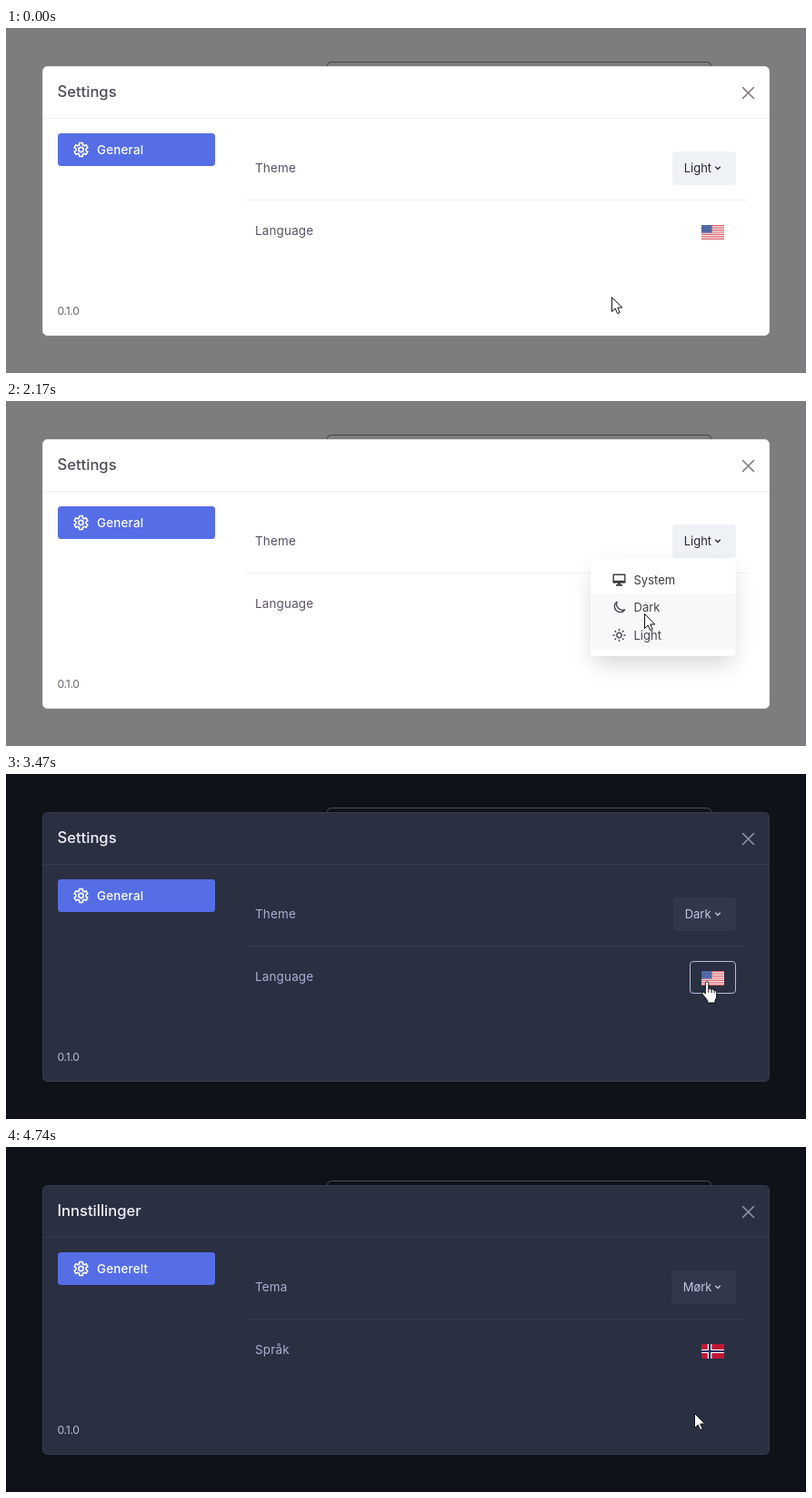
An HTML page that plays this animation: 880x380 px, repeating every 6.01 s.

```html
<!DOCTYPE html>
<html lang="en">
<head>
<meta charset="utf-8">
<title>Settings dialog</title>
<style>
html, body { margin: 0; width: 100%; height: 100%; overflow: hidden; }
svg { display: block; }
#stage {
  --back: #7c7d7e; --behind: #4a4143; --panel: #fff; --edge: #e4e6e8; --rule: #eff1f4;
  --title: #514c5a; --label: #5a5066; --version: #696373; --close: #80777b;
  --button: #eef2f7; --buttonText: #2b2540; --menu: #fff; --menuEdge: #fbfbfc;
  --item: #3b3b40; --itemOn: #46484c; --itemBack: #f6f8f9; --shade: .17;
  font-family: Poppins, Inter, sans-serif; font-size: 13.4px;
}
#stage.dark {
  --back: #0f1218; --behind: #484c5a; --panel: #2b2f42; --edge: #363b50; --rule: #353a4e;
  --title: #f1f2f8; --label: #aab0d3; --version: #b9bed3; --close: #9094a8;
  --button: #32374c; --buttonText: #c3c8e2; --menu: #2b2f42; --menuEdge: #34394f;
  --item: #9095b3; --itemOn: #dcdfed; --itemBack: #32374c; --shade: .2;
}
.title { font-size: 16.6px; font-weight: 500; fill: var(--title); }
.label { fill: var(--label); letter-spacing: .2px; }
.small { font-size: 13px; }
.medium { font-weight: 500; }
.item { fill: var(--item); color: var(--item); }
.item.on { fill: var(--itemOn); color: var(--itemOn); }
.item > .back { fill: var(--itemBack); visibility: hidden; }
.item.on > .back { visibility: visible; }
.line { fill: none; stroke: currentColor; stroke-width: 1.4; }
.pointer { fill: #fff; stroke: #111; stroke-linejoin: round; }
</style>
</head>
<body>
<svg id="stage" width="880" height="380" viewBox="0 0 880 380">
  <defs>
    <filter id="blur" x="-40%" y="-50%" width="180%" height="200%"><feGaussianBlur stdDeviation="13"/></filter>
    <symbol id="us" viewBox="0 0 26 13" preserveAspectRatio="none">
      <path fill="#f3eef0" d="M0 0H26V13H0Z"/>
      <path stroke="#df606b" d="M0 .5H26M0 2.5H26M0 4.5H26M0 6.5H26M0 8.5H26M0 10.5H26M0 12.5H26"/>
      <path fill="#4a619f" d="M0 0H12V7H0Z"/>
      <path stroke="#9aa8cc" stroke-width=".7" stroke-dasharray=".8 1.4" d="M1 1.2H11.5M2 3.5H11.5M1 5.8H11.5"/>
    </symbol>
    <symbol id="no" viewBox="0 0 22 16" preserveAspectRatio="none">
      <path fill="#c11734" d="M0 0H22V16H0Z"/>
      <path stroke="#fff" stroke-width="4" d="M8 0V16M0 8H22"/>
      <path stroke="#18305f" stroke-width="2" d="M8 0V16M0 8H22"/>
    </symbol>
    <symbol id="tr" viewBox="0 0 18 12" preserveAspectRatio="none">
      <path fill="#e30a17" d="M0 0H18V12H0Z"/>
      <circle cx="6.4" cy="6" r="3" fill="#fff"/><circle cx="7.2" cy="6" r="2.4" fill="#e30a17"/>
      <path fill="#fff" d="M8.6 6l2.3-1.2v2.4z"/>
    </symbol>
  </defs>

  <rect width="880" height="380" fill="var(--back)"/>
  <rect x="353.5" y="37.5" width="422" height="40" rx="4" fill="none" stroke="var(--behind)"/>
  <rect x="40.5" y="42.5" width="799" height="296" rx="5" fill="var(--panel)" stroke="var(--edge)"/>
  <path d="M41 99.5H839M263 189.5H816" stroke="var(--rule)"/>
  <path d="M810.5 65.5l12 12m0-12l-12 12" stroke="var(--close)" stroke-width="1.6" stroke-linecap="round"/>
  <text id="title" class="title" x="56.5" y="76"></text>
  <rect x="57" y="116" width="173" height="36" rx="3.5" fill="#556ee6"/>
  <g transform="translate(82.5 134)" fill="none" stroke="#fff" stroke-width="1.6" stroke-linejoin="round">
    <path id="gear"/><circle r="2.6"/>
  </g>
  <text id="general" class="medium" x="100" y="139" fill="#fff" letter-spacing=".2"></text>
  <text id="theme" class="label" x="274" y="159"></text>
  <text id="language" class="label" x="274" y="228"></text>
  <text x="56.5" y="316" fill="var(--version)" font-size="12.2" letter-spacing="-.3">0.1.0</text>

  <rect id="button" y="136" height="37" rx="4" fill="var(--button)"/>
  <rect id="pressed" x="733.5" y="136.5" width="69" height="36" rx="4" fill="#c8cbd0" stroke="#b2b5ba"/>
  <text id="choice" class="small" y="159" fill="var(--buttonText)"></text>
  <path d="M780.3 152.8l2.7 2.7 2.7-2.7" fill="none" stroke="var(--buttonText)" stroke-width="1.3"/>
  <rect id="flagFrame" x="752.5" y="206.5" width="50" height="35" rx="3.5" fill="none" stroke="#b8bdd6"/>
  <use id="flag" x="765" y="217" width="25" height="16"/>

  <g id="themeMenu"></g>
  <g id="languageMenu"></g>

  <g id="cursor" class="pointer">
    <path id="arrow" d="M.5 .5V16.5L4.2 13L6.7 18.6L9.2 17.5L6.8 12H11.7Z"/>
    <g id="hand">
      <path d="M-1.7 13V1.5a1.75 1.75 0 0 1 3.5 0V7.8q1.7-1.2 3.2.5 1.8-.8 3.1.8 2.6-.2 2.6 2.3V15.5q0 2.6-1.7 4.8V23H.8V20.6L-4.7 13.8q-1.3-2.5.7-2.9 1.1.1 2.3 2.1Z"/>
      <path d="M1.8 7.8v4M5 8.4v3.6M8.1 9.2v3" fill="none"/>
    </g>
  </g>
</svg>
<script>
const LOOP = 6010;
const THEME_OPEN = 950, RELEASE = 2070, GO_DARK = 2190;
const LANG_OPEN = 3550, GO_NORWEGIAN = 4740;
const OPEN_TIME = 300, DROP = 10;

const $ = id => document.getElementById(id);
const set = (id, attrs) => { for (const k in attrs) $(id).setAttribute(k, attrs[k]); };
const show = (id, on) => set(id, { visibility: on ? 'visible' : 'hidden' });
const progress = (t, from, to) => Math.min(1, Math.max(0, (t - from) / (to - from)));
const smooth = p => p * p * (3 - 2 * p);
const easeOut = p => 1 - (1 - p) ** 2;

const words = {
  en: { title: 'Settings', general: 'General', theme: 'Theme', language: 'Language' },
  no: { title: 'Innstillinger', general: 'Generelt', theme: 'Tema', language: 'Språk' }
};

// Start, end, destination x, destination y
const moves = [
  [345, 840, 773, 157],
  [1170, 1570, 701.5, 234],
  [2335, 2560, 696, 274],
  [2945, 3430, 771, 228.5],
  [3770, 4130, 757, 293]
];

function cursorAt(t) {
  let x = 666, y = 296;
  for (const [from, to, toX, toY] of moves) {
    const p = smooth(progress(t, from, to));
    x += (toX - x) * p;
    y += (toY - y) * p;
  }
  return { x, y };
}

const flagIcon = name => `<use href="#${name}" x="668" y="10" width="18" height="12"/>`;
const rays = Array.from({ length: 8 }, (_, i) =>
  `<path d="M0-4.8V-7" transform="rotate(${i * 45})"/>`).join('');
const themeItems = [
  ['System', '<path class="line" d="M668.2 9.7H680.8V18.3H668.2Z"/><path fill="currentColor" d="M668 16.3h13v2.4h-13zM673 18h3v3h-3zM671 20.6h7v1.6h-7z"/>'],
  ['Dark', '<path class="line" stroke-linejoin="round" d="M671.9 9.2A6.3 6.3 0 1 0 680.7 18A7 7 0 0 1 671.9 9.2Z"/>'],
  ['Light', `<g class="line" transform="translate(674.5 15.5)"><circle r="2.7"/>${rays}</g>`]
];
const languageItems = [
  ['English', flagIcon('us')], ['Norwegian', flagIcon('no')], ['Turkish', flagIcon('tr')]
];

function makeMenu(id, top, height, pad, step, textX, items) {
  const rows = items.map(([text, icon], i) =>
    `<g class="item" transform="translate(0 ${top + pad + i * step})">
      <rect class="back" x="643.5" width="159" height="${step}"/>${icon}
      <text class="small" x="${textX}" y="20">${text}</text></g>`).join('');
  $(id).innerHTML =
    `<rect x="647" y="${top + 14}" width="152" height="${height - 6}" rx="4" filter="url(#blur)" opacity="var(--shade)"/>
     <rect x="643.5" y="${top + .5}" width="159" height="${height - 1}" rx="3.5" fill="var(--menu)" stroke="var(--menuEdge)"/>${rows}`;
  const nodes = $(id).querySelectorAll('.item');
  return (t, open, close, y, active) => {
    const shown = t >= open && t < close;
    show(id, shown);
    const offset = DROP * (1 - easeOut(progress(t, open, open + OPEN_TIME)));
    set(id, { transform: `translate(0 ${offset})` });
    const hovered = Math.floor((y - top - pad - offset) / step);
    nodes.forEach((node, i) => node.classList.toggle('on', i === active || i === hovered));
    if (!shown) nodes.forEach(node => node.classList.remove('on'));
  };
}

const drawThemeMenu = makeMenu('themeMenu', 173, 108, 8.5, 30.5, 690.5, themeItems);
const drawLanguageMenu = makeMenu('languageMenu', 242, 112.5, 9, 31.3, 693.5, languageItems);
$('languageMenu').classList.add('medium');

function gearPath() {
  const points = [];
  for (let i = 0; i < 6; i++)
    for (const [turn, r] of [[-.29, 5.6], [-.2, 7.7], [.2, 7.7], [.29, 5.6]]) {
      const a = i * Math.PI / 3 + turn * 1.2 - Math.PI / 2;
      points.push((r * Math.cos(a)).toFixed(2) + ' ' + (r * Math.sin(a)).toFixed(2));
    }
  return 'M' + points.join('L') + 'Z';
}
set('gear', { d: gearPath() });

function draw(t) {
  const dark = t >= GO_DARK, norwegian = t >= GO_NORWEGIAN;
  const { x, y } = cursorAt(t);
  $('stage').classList.toggle('dark', dark);

  const text = words[norwegian ? 'no' : 'en'];
  for (const id in text) $(id).textContent = text[id];
  $('choice').textContent = norwegian ? 'Mørk' : dark ? 'Dark' : 'Light';
  const left = norwegian ? 732 : dark ? 734 : 733;
  set('button', { x: left, width: 803 - left });
  set('choice', { x: left + 12.7 });
  set('flag', { href: norwegian ? '#no' : '#us' });

  const overTheme = !dark && x > 733 && y > 136 && y < 173;
  const overFlag = dark && x > 752 && x < 803 && y > 206 && y < 242;
  const pressed = dark ? 0 : t >= THEME_OPEN ? 1 - progress(t, RELEASE, RELEASE + 100) : +overTheme;
  set('pressed', { opacity: pressed });
  show('flagFrame', overFlag && t < LANG_OPEN);

  drawThemeMenu(t, THEME_OPEN, GO_DARK, y, 2);
  drawLanguageMenu(t, LANG_OPEN, GO_NORWEGIAN, y, 0);

  set('cursor', { transform: `translate(${Math.round(x)} ${Math.round(y)})` });
  show('hand', overTheme || overFlag);
  show('arrow', !overTheme && !overFlag);
}

const start = performance.now();
function tick() {
  draw((performance.now() - start) % LOOP);
  requestAnimationFrame(tick);
}
tick();
</script>
</body>
</html>
```
